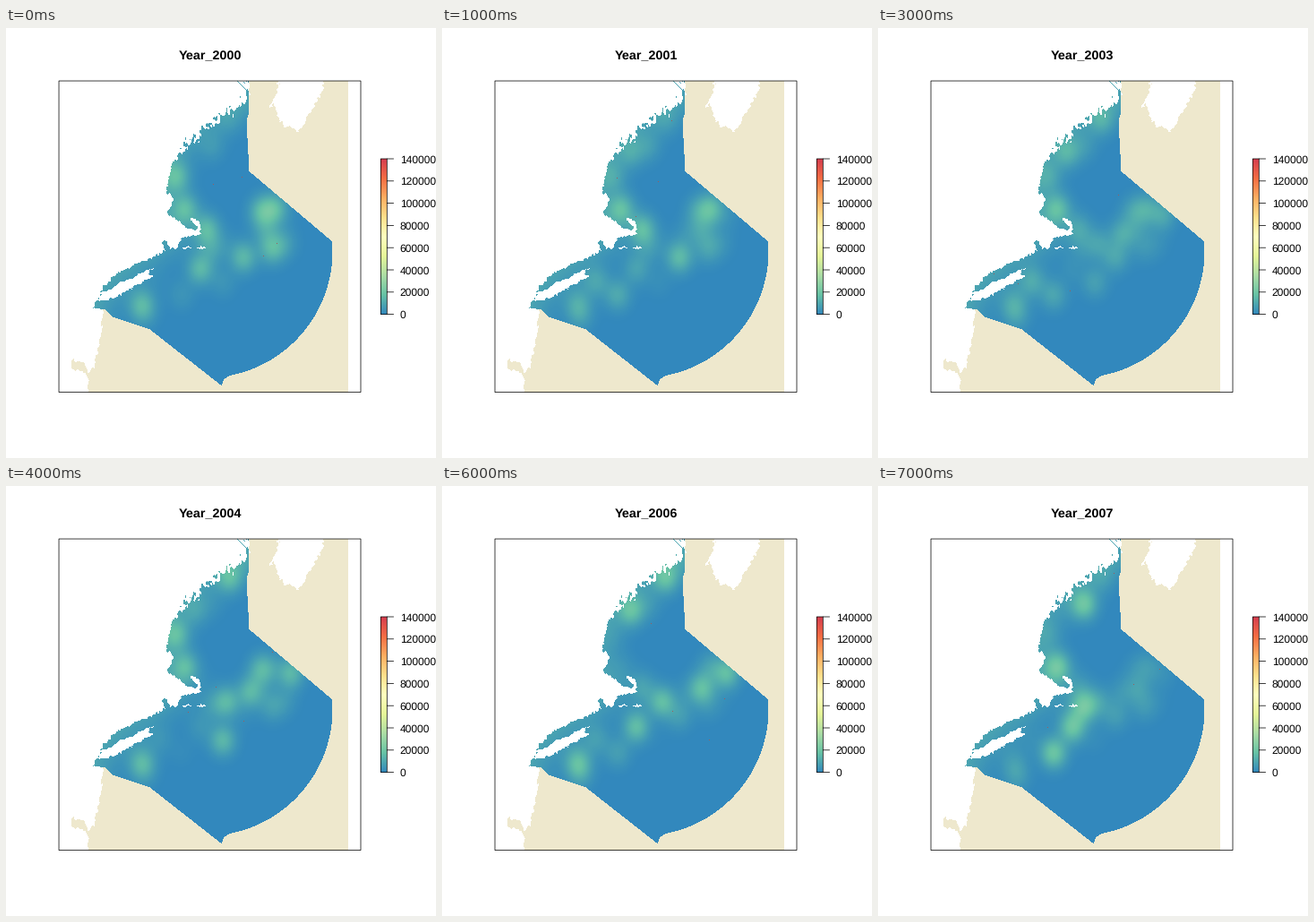
These frames come from a looping animation (480x480 px, 8 s). A matplotlib script:

```python
import numpy as np
import matplotlib.pyplot as plt
from matplotlib.animation import FuncAnimation
from matplotlib.colors import LinearSegmentedColormap
from matplotlib.patches import Rectangle
from matplotlib.path import Path

SIZE, DPI = 480, 80
PX = 72 / DPI  # points per pixel
LINE = 0.75 * PX
LEFT, TOP, RIGHT, BOTTOM = 59.04, 59.04, 396, 406.56
TOP_VALUE = 140  # thousands
BEIGE = np.array([238, 232, 205]) / 255
SPECTRAL = ["#3288BD", "#66C2A5", "#ABDDA4", "#E6F598", "#FFFFBF",
            "#FEE08B", "#FDAE61", "#F46D43", "#D53E4F"]
cmap = LinearSegmentedColormap.from_list("heat", SPECTRAL, N=512)

plt.rcParams["font.family"] = "Liberation Sans"
plt.rcParams["text.hinting"] = "none"
rng = np.random.default_rng(12)
yy, xx = np.mgrid[0:SIZE, 0:SIZE] + 0.5

# Rough outlines in pixels, y pointing down; noise adds the detail
MAINLAND = [
    (0, 0), (270, 0), (270, 70), (263, 83), (257, 91), (245, 96),
    (232, 104), (220, 113), (207, 126), (195, 140), (183, 154), (181, 176),
    (180, 184), (187, 190), (185, 198), (179, 208), (187, 211), (198, 221),
    (212, 226), (214, 222), (204, 213), (211, 212), (218, 222), (217, 230),
    (196, 234), (190, 246), (183, 247), (177, 236), (174, 238), (178, 248),
    (160, 258), (134, 268), (121, 276), (109, 288), (97, 313), (108, 314),
    (106, 346), (97, 380), (91, 384), (89, 374), (73, 370), (73, 380),
    (88, 385), (91, 392), (91, SIZE), (0, SIZE),
]
SMALL_LAND = [
    [(103, 304), (107, 296), (130, 284), (157, 271), (167, 268), (159, 274),
     (164, 277), (138, 292), (125, 299), (110, 305)],
    [(196, 247), (202, 243), (209, 247)],
    [(212, 246), (219, 243), (224, 247)],
    [(307, 50), (355, 50), (354, 68), (343, 88), (332, 108), (325, 116),
     (318, 109), (309, 110), (299, 85), (301, 75)],
    [(293, 94), (297, 82), (308, 61), (304, 74)],
]

# Places where the heat gathers, and which of them are hot each year
SITES = [
    (250, 102), (230, 132), (211, 139), (190, 166), (200, 202), (224, 225),
    (230, 246), (217, 269), (196, 298), (172, 283), (152, 310), (242, 284),
    (246, 241), (265, 256), (273, 230), (286, 205), (300, 202), (318, 209),
    (297, 246), (311, 240), (268, 82), (155, 324), (290, 226),
]
HOT = {
    2000: [3, 4, 5, 7, 10, 13, 15, 16, 18],
    2002: [2, 4, 5, 8, 9, 13, 16],
    2004: [0, 3, 4, 10, 11, 12, 14, 15, 17],
    2005: [1, 5, 7, 9, 13, 15, 21],
    2006: [0, 2, 7, 10, 12, 17, 22],
    2007: [1, 4, 6, 7, 8],
}


def blur(a, sx, sy):
    fx, fy = np.fft.fftfreq(SIZE), np.fft.fftfreq(SIZE)[:, None]
    kernel = np.exp(-2 * np.pi**2 * ((sx * fx) ** 2 + (sy * fy) ** 2))
    return np.fft.ifft2(np.fft.fft2(a) * kernel).real


def noise(sx, sy):
    """Smooth random field with unit spread."""
    a = blur(rng.standard_normal((SIZE, SIZE)), sx, sy)
    return a / a.std()


def inside(points, dx=0, dy=0):
    cells = np.column_stack([(xx + dx).ravel(), (yy + dy).ravel()])
    return Path(points).contains_points(cells).reshape(xx.shape)


def study_area():
    cx, cy, r = 223, 249, 141.5
    t = np.linspace(np.arcsin((239 - cy) / r), np.arccos((250 - cx) / r), 60)
    arc = list(zip(cx + r * np.cos(t), cy + r * np.sin(t)))
    return ([(271, 50), (271, 95), (268.5, 104), (271.5, 160), (365, 239)]
            + arc + [(243, 392), (241, 399), (239, 398), (160, 336),
                     (120, 323), (110, 313.5), (90, 313.5), (90, 50)])


def build_masks():
    rugged = np.clip((150 - yy) / 15, 0, 1) * (xx > 180)
    amp = 0.8 + 2 * rugged
    land = inside(MAINLAND, amp * noise(0.8, 1.4), amp * noise(0.8, 1.8))
    dx, dy = 0.8 * noise(1, 1), 0.8 * noise(1, 1)
    for shape in SMALL_LAND:
        land |= inside(shape, dx, dy)
    frame = (xx > LEFT) & (xx < RIGHT) & (yy > TOP) & (yy < BOTTOM)
    area = inside(study_area())
    river = (np.abs(xx - yy - 199) < 0.8) & (yy < 71)
    sea = area & (~land | river) & frame
    outer = ~area & ~land & frame & (xx < 382)
    return sea, outer, land


sea, outer, land = build_masks()
shore = 12 * blur(land, 16, 16)  # mild warmth close to land


def heat(year):
    if year not in HOT:
        return (heat(year - 1) + heat(year + 1)) / 2
    level = np.random.default_rng(year).uniform(0, 7, len(SITES))
    level[HOT[year]] = 42 / np.sqrt(len(HOT[year]))
    z = shore.copy()
    for (x, y), h in zip(SITES, level):
        z += h * np.exp(-((xx - x) / 10) ** 2 / 2 - ((yy - y) / 12) ** 2 / 2)
    return z


def paint(year):
    img = np.ones((SIZE, SIZE, 3))
    img[outer] = BEIGE
    img[sea] = cmap(heat(year) / TOP_VALUE)[sea, :3]
    # A few single hot cells
    cells = np.argwhere(sea & (xx < 320) & (yy < 300))
    for y, x in np.random.default_rng(year).choice(cells, 4):
        img[y, x] = (0.62, 0.36, 0.36)
    return img


YEARS = range(2000, 2008)
maps = [paint(year) for year in YEARS]

fig = plt.figure(figsize=(SIZE / DPI, SIZE / DPI), dpi=DPI, facecolor="white")
ax = fig.add_axes([0, 0, 1, 1])
ax.axis("off")
picture = ax.imshow(maps[0], extent=(0, SIZE, SIZE, 0), aspect="auto",
                    interpolation="nearest")


def outline(x0, y0, x1, y1):
    ax.add_patch(Rectangle((x0, y0), x1 - x0, y1 - y0, fill=False,
                           ec="black", lw=LINE, snap=False, zorder=3))


# Colour bar
BAR_LEFT, BAR_RIGHT, BAR_TOP, BAR_END = 418.3, 425.3, 146, 319.6
ax.imshow(np.linspace(1, 0, 256)[:, None], cmap=cmap, aspect="auto",
          extent=(BAR_LEFT, BAR_RIGHT, BAR_END, BAR_TOP), zorder=2)
outline(BAR_LEFT, BAR_TOP, BAR_RIGHT, BAR_END)
for value in range(0, TOP_VALUE + 1, 20):
    y = BAR_END - (BAR_END - BAR_TOP) * value / TOP_VALUE
    ax.plot([BAR_RIGHT, BAR_RIGHT + 7.2], [y, y], color="black", lw=LINE,
            snap=False, zorder=3)
    ax.text(439.7, y + 4.4, str(value * 1000), fontsize=12 * PX,
            va="baseline")

outline(LEFT, TOP, RIGHT, BOTTOM)
title = ax.text((LEFT + RIGHT) / 2 + 0.5, 35, "", fontsize=14.4 * PX,
                weight="bold", ha="center", va="baseline")
ax.set_xlim(0, SIZE)
ax.set_ylim(SIZE, 0)


def update(i):
    picture.set_data(maps[i])
    title.set_text(f"Year_{YEARS[i]}")
    return picture, title


anim = FuncAnimation(fig, update, frames=len(YEARS), interval=1000,
                     repeat=True, repeat_delay=0)
plt.show()
```
